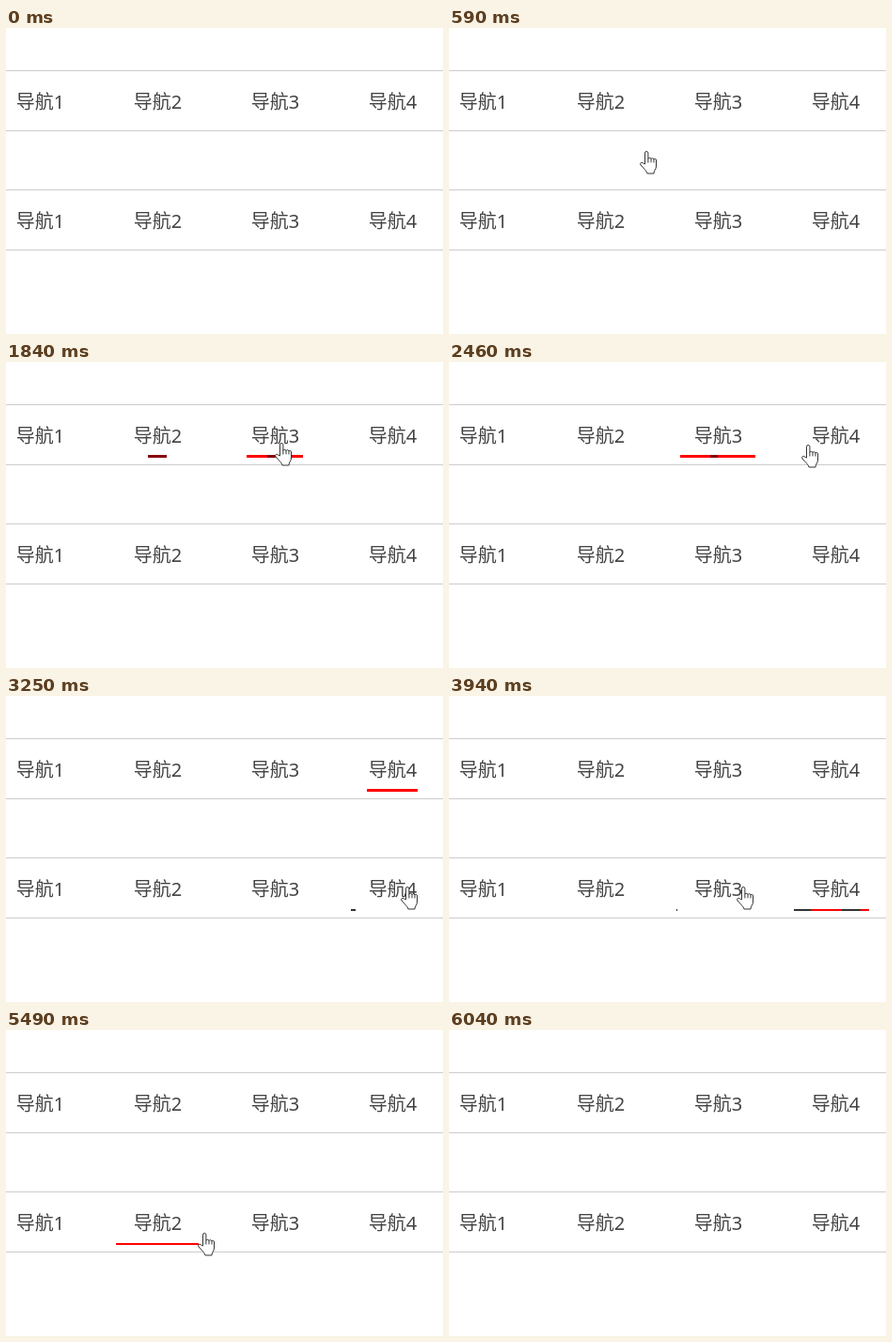
Animation of 465x326 px, one loop 6.42 s. Source, as an HTML page:

```html
<!DOCTYPE html>
<html lang="zh">
<head>
<meta charset="utf-8">
<style>
html, body { margin: 0; width: 100%; height: 100%; overflow: hidden; background: #fff; }
nav { position: absolute; left: 0; width: 465px; height: 63px; border: solid #ccc; border-width: 1px 0; }
nav span {
  position: absolute; top: 1px; width: 89px; text-align: center; white-space: nowrap;
  font: 20px/64px "Noto Sans", "Noto Sans CJK SC", "Noto Sans CJK", sans-serif; color: #444;
}
.line { position: absolute; width: 88px; }
#hand { position: absolute; left: 0; top: 0; overflow: visible; }
</style>
</head>
<body>
<nav style="top:45px"></nav>
<nav style="top:172px"></nav>
<svg id="hand" width="18" height="25" fill="#fff" stroke="#333" stroke-linejoin="round">
  <path d="M5.5 14V2.2a1.7 1.7 0 0 1 3.4 0V8.5q0-1.2 1.5-1.2t1.6 1.4q.2-1 1.5-1t1.5 1.5q.3-.9 1.3-.8 1.2.1 1.2 1.6V16q0 2.5-1.5 4.5-1 1.5-1 3.5H8q-.5-2-2-3.5L1 15q-1-1.6.2-2.4 1.5-.8 3 .8z"/>
  <path d="M8.9 8.5v4M12 8.7v3.6M15 9.2v3.3"/>
</svg>
<script>
const LOOP = 6420, FADE = 500, WIDTH = 88;
const BEGIN = 200, STEP = 77.75;  // the picture advances in even steps
const hand = document.getElementById('hand');
const itemX = i => i * 125 - 133;

// Pointer moves: start, end, x, y reached
const moves = [
  [200, 750, 164, 86], [1540, 1700, 286, 86], [2310, 2470, 377, 88],
  [3085, 3245, 421, 205], [3790, 3950, 302, 203], [4720, 4880, 188, 208],
  [5410, 5860, 396, 310]
];
const entry = [354, 304];

// dark: from/to pairs of the stretches that stay dark
const lines = [
  { item: 2, on: 612, off: 1600, centred: true, dark: [15, 73] },
  { item: 3, on: 1635, off: 2405, centred: true, dark: [36, 44] },
  { item: 4, on: 2450, off: 3112, centred: true, dark: [] },
  { item: 4, on: 3194, off: 3882, dark: [0, 18, 51, 71] },
  { item: 3, on: 3922, off: 4815, dark: [0, 15] },
  { item: 2, on: 4862, off: 5510, dark: [] }
];

document.querySelectorAll('nav').forEach(nav => {
  for (let i = 1; i <= 4; i++) {
    const label = document.createElement('span');
    label.textContent = '导航' + i;
    label.style.left = itemX(i) + 'px';
    nav.append(label);
  }
});

for (const line of lines) {
  const { item, centred, dark } = line;
  const colours = ['#f00', centred ? '#86000c' : '#333'];
  const edges = [0, ...dark, WIDTH];
  const stops = edges.slice(1).map((x, i) => `${colours[i % 2]} ${edges[i]}px ${x}px`);
  line.el = document.createElement('div');
  line.el.className = 'line';
  line.el.style.cssText = `left:${itemX(item)}px;top:${centred ? 99 : 227}px;` +
    `height:${centred ? 3 : 2}px;background:linear-gradient(90deg,${stops})`;
  hand.before(line.el);
}

const clamp = x => Math.min(1, Math.max(0, x));

// CSS "ease": cubic-bezier(.25, .1, .25, 1)
function ease(x) {
  if (x <= 0 || x >= 1) return clamp(x);
  let lo = 0, hi = 1, s;
  for (let i = 0; i < 20; i++) {
    s = (lo + hi) / 2;
    if (.75 * s * (1 - s) + s ** 3 < x) lo = s; else hi = s;
  }
  return .3 * s * (1 - s) ** 2 + 3 * s * s * (1 - s) + s ** 3;
}

function moveHand(t) {
  let [x, y] = entry;
  for (const [from, to, endX, endY] of moves) {
    const k = clamp((t - from) / (to - from));
    const smooth = k * k * (3 - 2 * k);
    x += (endX - x) * smooth;
    y += (endY - y) * smooth;
  }
  const visible = t >= moves[0][0] && t < moves.at(-1)[1];
  hand.style.display = visible ? '' : 'none';
  hand.style.transform = `translate(${Math.round(x)}px,${Math.round(y)}px)`;
}

function draw(now) {
  const t = BEGIN + Math.floor((now % LOOP - BEGIN) / STEP) * STEP;
  for (const { el, on, off, centred } of lines) {
    const w = WIDTH * (ease((t - on) / FADE) - ease((t - off) / FADE));
    const left = centred ? Math.round((WIDTH - w) / 2) : 0;
    const right = centred ? left : WIDTH - Math.round(w);
    el.style.clipPath = `inset(0 ${right}px 0 ${left}px)`;
  }
  moveHand(t);
}

const start = performance.now();
function tick() {
  draw(performance.now() - start);
  requestAnimationFrame(tick);
}
tick();
</script>
</body>
</html>
```
